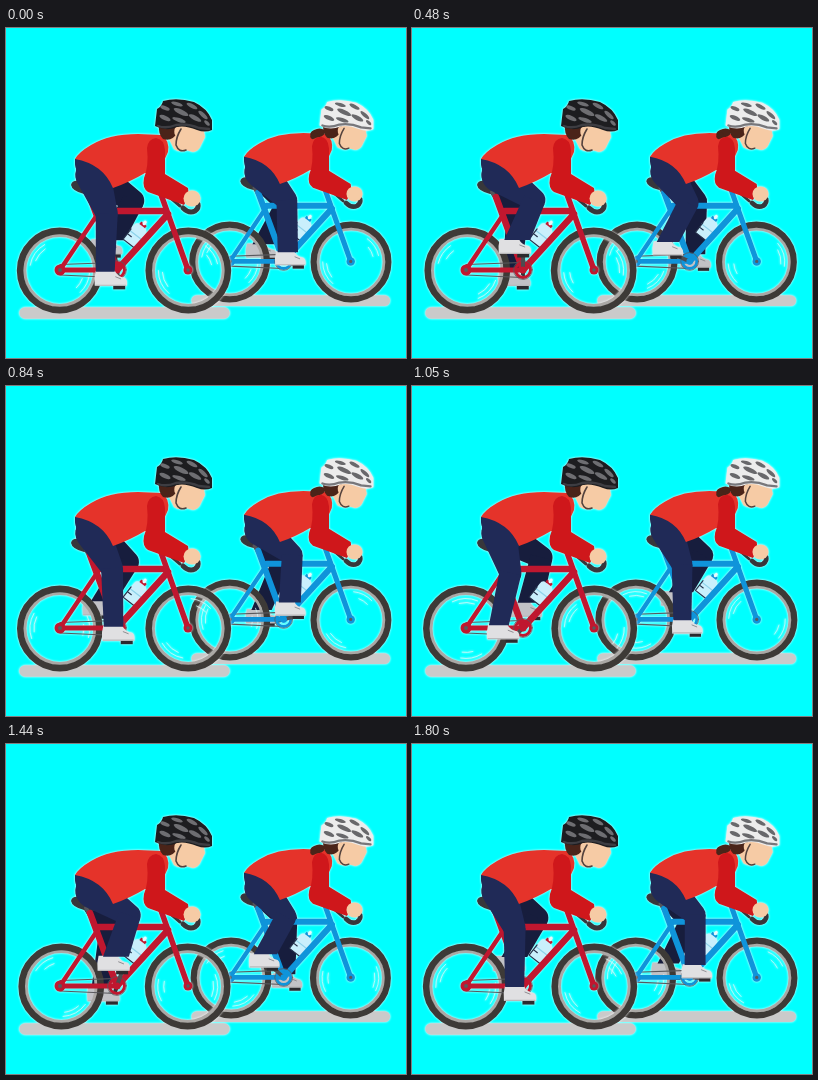
Write an HTML page with a canvas that moves like this. It is 400 by 330 pixels and loops after 1.83 s.

```html
<!DOCTYPE html>
<html lang="en">
<head>
<meta charset="utf-8">
<title>Two cyclists</title>
<style>
html, body { margin: 0; width: 100%; height: 100%; overflow: hidden; background: #0ff; }
canvas { display: block; width: 400px; height: 330px; }
</style>
</head>
<body>
<canvas id="stage" width="400" height="330"></canvas>
<script>
const stage = document.getElementById('stage').getContext('2d');
const layer = document.createElement('canvas');
layer.width = 400;
layer.height = 330;
const ctx = layer.getContext('2d');

const LOOP = 1830, STEP = 30, TAU = Math.PI * 2;
const rad = deg => deg * Math.PI / 180;

const CRANK = { x: 111, y: 242 };
const HIP = { x: 87, y: 147 };
const HUBS = [54.5, 182];
const TIRE = '#3d3a37', DARK = '#37373b', SKIN = '#f6cba5', HAIR = '#4a2419';

const RED_BIKE = {
  frame: '#c0172f', helmet: '#1d1d20', rim: '#3d3d42', vent: '#6e6e72',
  phase: 82, ground: 285, ponytail: false, place: [1, 0, 0, 1, 0, 0]
};
const BLUE_BIKE = {
  frame: '#0f94da', helmet: '#ececec', rim: '#77777b', vent: '#68686b',
  phase: 15, ground: 283.5, ponytail: true, place: [0.944, 0, 0, 0.944, 172.9, 5]
};
const NEAR = { pants: '#202a57', shoe: '#e0e0e2', knee: 0, ankle: 0 };
const FAR = { pants: '#171d3d', shoe: '#c2c2c6', knee: 6, ankle: 3 };

function fill(d, color) {
  ctx.fillStyle = color;
  ctx.fill(new Path2D(d));
}

function line(d, color, width, cap = 'round') {
  ctx.strokeStyle = color;
  ctx.lineWidth = width;
  ctx.lineCap = cap;
  ctx.lineJoin = 'round';
  ctx.stroke(new Path2D(d));
}

function oval(x, y, rx, ry, color, turn = 0) {
  ctx.fillStyle = color;
  ctx.beginPath();
  ctx.ellipse(x, y, rx, ry, rad(turn), 0, TAU);
  ctx.fill();
}

function ring(x, y, r, color, width, from = 0, to = TAU) {
  ctx.strokeStyle = color;
  ctx.lineWidth = width;
  ctx.beginPath();
  ctx.arc(x, y, r, from, to);
  ctx.stroke();
}

// Tapered limb between two circles
function limb(a, ra, b, rb, color) {
  const dir = Math.atan2(b.y - a.y, b.x - a.x);
  const spread = Math.acos((ra - rb) / Math.hypot(b.x - a.x, b.y - a.y));
  ctx.fillStyle = color;
  ctx.beginPath();
  ctx.arc(a.x, a.y, ra, dir + spread, dir - spread + TAU);
  ctx.arc(b.x, b.y, rb, dir - spread, dir + spread);
  ctx.fill();
}

function wheel(x, y, turn) {
  ring(x, y, 35, '#aaa8a5', 3.2);
  ring(x, y, 39.6, TIRE, 6.6);
  ctx.lineCap = 'round';
  for (const [r, at, span] of [[30, 0, 50], [26, 12, 34], [30, 175, 42], [24, 190, 26]]) {
    const from = rad(at) + turn;
    ring(x, y, r, '#d9f7f7', 0.8, from, from + rad(span));
  }
}

function pedalAt(angle) {
  return { x: CRANK.x + 16 * Math.cos(angle), y: CRANK.y + 16 * Math.sin(angle) };
}

function crank(angle, color) {
  const p = pedalAt(angle);
  line(`M${CRANK.x} ${CRANK.y}L${p.x} ${p.y}`, color, 4);
}

function leg(angle, side) {
  const p = pedalAt(angle), s = Math.sin(angle);
  const lift = Math.cos(angle - rad(300));
  const knee = { x: 111 + 13 * lift + side.knee, y: 179 - 8 * lift };
  const ankle = { x: p.x - 10 - 4 * s + side.ankle, y: p.y - 14 };
  const half = 11.2 - 1.8 * s;

  ctx.fillStyle = '#2b2b2f';
  ctx.fillRect(p.x - 6, p.y - 1, 12, 4.5);

  ctx.save();
  ctx.translate(p.x + 0.5, p.y);
  fill('M-24 -15L-5 -15Q-2 -9 5 -8Q8 -6 7 0L-25 0Q-26 -8 -24 -15Z', side.shoe);
  line('M-24 -.6L6 -.6', '#b9b9bb', 1.2);
  line('M-4 -9L1 -7', '#8e8e92', 1);
  ctx.restore();

  fill('M69 131L96 133L107 161L90 166Q68 150 69 131Z', side.pants);
  limb(HIP, 17.5, knee, 11, side.pants);
  const dx = ankle.x - knee.x, dy = ankle.y - knee.y, len = Math.hypot(dx, dy);
  const nx = dy / len * 11, ny = -dx / len * 11;
  fill(`M${knee.x - nx} ${knee.y - ny}L${ankle.x - half} ${ankle.y}` +
       `L${ankle.x + half} ${ankle.y}L${knee.x + nx} ${knee.y + ny}Z`, side.pants);
}

function bottle(frame) {
  ctx.save();
  ctx.translate(130, 206);
  ctx.rotate(rad(38));
  fill('M-7 -5Q-7 -10 -3 -10L3 -10Q7 -10 7 -5L7 12L-7 12Z', '#c9effc');
  fill('M-3.5 -13L3.5 -13L3.5 -10L-3.5 -10Z', frame);
  line('M0 -15L0 -13', '#e9f8fc', 3);
  line('M-7 1L7 1', '#8ed2ea', 1.2);
  line('M-7 -1L-7 12L7 12M-7 5L-2 5', '#25304a', 1.2);
  ctx.restore();
}

function bike(rider, angle) {
  const c = rider.frame;
  fill('M65 157Q66 152 73 153L84 158Q91 163 88 167L78 166Q66 163 65 157Z', DARK);
  line('M80 164L84 171', '#54545a', 4);
  bottle(c);
  line('M54 236.5L110 234.5M54 247L110 249.5', '#59595d', 1.2);
  line('M54 242L93 184', c, 4.5);
  line('M54 242L111 242', c, 5);
  line('M84 169L111 242L162 186M93 183L160 183', c, 6.5);
  line('M152 158L162 186L182 242', c, 5.5);
  oval(54, 242, 5.5, 5.5, c);
  oval(54, 242, 2, 2, '#59595d');
  oval(182, 242, 4.5, 4.5, c);
  oval(182, 242, 1.7, 1.7, '#59595d');
  ring(CRANK.x, CRANK.y, 7.5, c, 3);
  ring(CRANK.x, CRANK.y, 9.4, '#59595d', 0.8);
  crank(angle, '#4c4c50');
  oval(CRANK.x, CRANK.y, 3.5, 3.5, c);
}

function torso() {
  fill('M69 131Q73 124 85 117Q103 106 132 106L156 107Q164 113 162 124' +
       'L152 146L139 145Q124 154 107 160Q97 136 69 131Z', '#e5332a');
}

function arm() {
  line('M153 160L174 178', DARK, 3);
  line('M177 180Q183 186 189 183Q193 180 192 176', DARK, 5);
  fill('M141 120Q142 111 150 110Q158 111 159 122L159 146L182 160' +
       'Q184 168 178 177L142 164Q136 160 138 150Q143 138 141 120Z', '#cf171b');
  oval(186, 170.5, 8.5, 8, SKIN);
}

function head(rider) {
  if (rider.ponytail) {
    oval(147, 106, 8, 4.5, HAIR, -12);
    oval(143, 109, 4, 3, HAIR, -30);
  }
  fill('M159 103L168 121Q174 125 180 122L187 124Q193 123 195 117L199 109' +
       'L197 99L170 96Z', SKIN);
  fill('M153 97L173 96L171 105Q166 114 157 111Q152 106 153 97Z', HAIR);
  oval(171.5, 103.5, 3.2, 4.8, SKIN);
  line('M175 101Q170 109 170 117Q173 125 180 122', '#54433e', 1.6);
  fill('M149 98L151 81Q156 78 157 73Q171 69 188 74Q201 80 206 92L206 102' +
       'Q199 105 191 102Q179 97 171 99Q160 104 149 98Z', rider.helmet);
  line('M152 98Q160 101 170 97Q181 95 193 100L203 101', rider.rim, 2.4);
  const vents = [
    [159, 80, 5, 2, 22], [171, 76, 6, 1.8, 16], [186, 78, 6, 2, 28],
    [197, 87, 6, 2, 42], [175, 84, 8, 2.4, 25], [189, 90, 7, 2.3, 28],
    [159, 90, 6, 2.2, 24], [173, 92, 7, 2, 18], [201, 95, 3.5, 1.6, 45]
  ];
  for (const [x, y, rx, ry, turn] of vents) oval(x, y, rx, ry, rider.vent, turn);
}

function cyclist(rider, turn) {
  const angle = rad(rider.phase) + turn;
  ctx.clearRect(0, 0, 400, 330);
  ctx.save();
  ctx.transform(...rider.place);
  line(`M19 ${rider.ground}L218 ${rider.ground}`, '#cacaca', 11.5);
  crank(angle + Math.PI, '#343438');
  leg(angle + Math.PI, FAR);
  const sway = 0.8 * Math.cos(turn - rad(189));
  HUBS.forEach((x, i) => wheel(x + sway * (1 - 1.4 * i), 242.5, turn + rad(190 - 60 * i)));
  bike(rider, angle);
  leg(angle, NEAR);
  torso();
  head(rider);
  arm();
  ctx.restore();
  stage.drawImage(layer, 0, 0);
}

function draw(ms) {
  const t = Math.floor(ms % LOOP / STEP) * STEP;
  const turn = 2 * TAU * t / LOOP;
  stage.shadowBlur = 0;
  stage.fillStyle = '#0ff';
  stage.fillRect(0, 0, 400, 330);
  // Pale fringe around each silhouette
  stage.shadowColor = '#fff';
  stage.shadowBlur = 1.6;
  cyclist(BLUE_BIKE, turn);
  cyclist(RED_BIKE, turn);
}

const start = performance.now();
function tick() {
  draw(performance.now() - start);
  requestAnimationFrame(tick);
}
tick();
</script>
</body>
</html>
```
